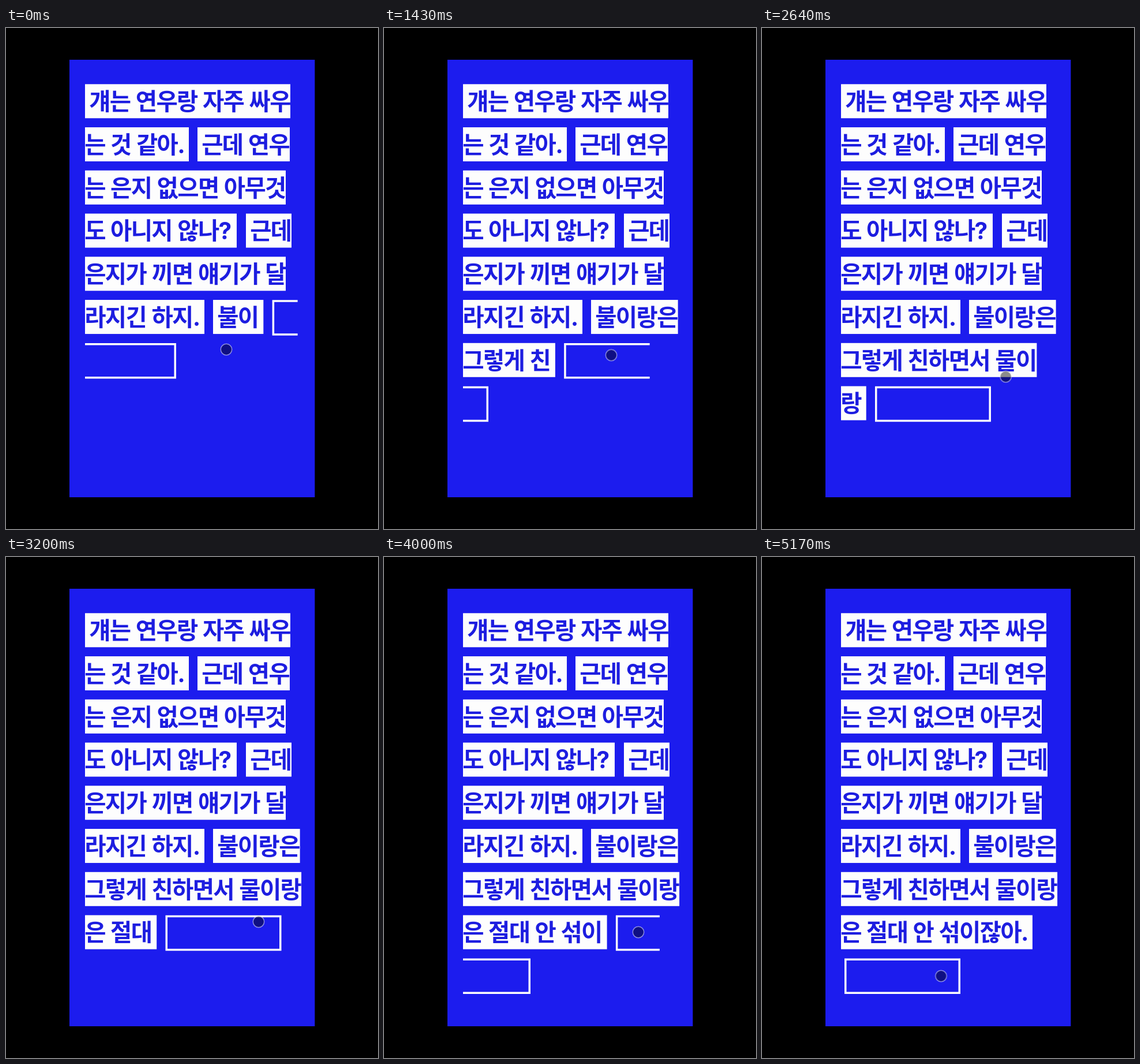
These frames come from a looping animation (645x868 px, 5200 ms). An HTML page:

```html
<!DOCTYPE html>
<html lang="ko">
<head>
<meta charset="utf-8">
<title>대화</title>
<style>
html, body { margin: 0; width: 100%; height: 100%; overflow: hidden; background: #000; }
svg { display: block; width: 645px; height: 868px; }
text {
  font: 700 40.6px "Noto Sans CJK KR", "Noto Sans CJK", sans-serif;
  letter-spacing: -1.68px;
  fill: #1d1de0;
}
.mark { font-family: Inter, sans-serif; }
.box { fill: #fdfdfd; }
.slot { fill: none; stroke: #fdfdfd; stroke-width: 3.5; }
#dot {
  fill: rgba(0, 0, 0, .45);
  stroke: rgba(255, 255, 255, .5);
  stroke-width: 1.5;
  animation: roam 5200ms infinite ease-in-out;
}
@keyframes roam {
  0%, 19% { transform: translate(382px, 557px); }
  37%, 43% { transform: translate(408.5px, 578.5px); }
  59%, 63% { transform: translate(438px, 632px); }
  75.7% { transform: translate(440px, 649px); }
  77%, 86% { transform: translate(441px, 650px); }
  95%, 100% { transform: translate(310.5px, 726px); }
}
</style>
</head>
<body>
<svg viewBox="0 0 645 868">
  <rect x="110" y="55" width="425.4" height="758" fill="#1c1cee"/>
  <g id="fixed"></g>
  <g id="typed"></g>
  <circle id="dot" r="9.7"/>
</svg>
<script>
const LOOP = 5200, LEFT = 137, LIMIT = 512.5, PAD = 8, GAP = 15.3;
const $ = id => document.getElementById(id);
const rowTop = row => 97.3 + 74.75 * row;
const advance = ch => ch === ' ' ? 9.2 : ch === '.' ? 11 : 35.67;
const measure = text => [...text].reduce((sum, ch) => sum + advance(ch), 0);

function box(row, x, right, textX, text) {
  const y = rowTop(row);
  let out = `<rect class="box" x="${x}" y="${y}" width="${right - x}" height="59"/>`;
  for (const word of text.split(' ')) {
    const body = word.replace(/[.?]/g, '<tspan class="mark">$&</tspan>');
    out += `<text x="${textX - 0.8}" y="${y + 44.7}">${body}</text>`;
    textX += measure(word + ' ');
  }
  return out;
}

// Empty answer slot; a side that continues on another row stays open.
function slot(row, x, width, openLeft, openRight) {
  const top = rowTop(row) + 1.9, bottom = top + 58;
  const l = openLeft ? x : x + 1.75;
  const r = openRight ? x + width : x + width - 1.75;
  const d = openRight ? `M${r} ${top}H${l}V${bottom}H${r}`
    : `M${l} ${top}H${r}V${bottom}H${l}${openLeft ? '' : 'Z'}`;
  return `<path class="slot" d="${d}"/>`;
}

$('fixed').innerHTML = [
  [0, 137, 493, 145, '걔는 연우랑 자주 싸우'],
  [1, 137, 317, 137, '는 것 같아.'],
  [1, 332, 492, 340, '근데 연우'],
  [2, 137, 485, 137, '는 은지 없으면 아무것'],
  [3, 137, 400, 137, '도 아니지 않나?'],
  [3, 416, 495, 424, '근데'],
  [4, 137, 485, 137, '은지가 끼면 얘기가 달'],
  [5, 137, 344, 137, '라지긴 하지.']
].map(b => box(...b)).join('');

const LINE = '불이랑은 그렇게 친하면서 물이랑은 절대 안 섞이잖아.';
const TIMES = [270, 610, 900, 1060, 1220, 1400, 1560, 1720, 1880, 2090, 2280,
  2440, 2620, 2850, 3030, 3360, 3580, 3800, 4180, 4380, 4580];
// Slot widths before and after each place where it may wrap.
const SPLITS = [[201, 0], [148.5, 44], [116.5, 84.5], [76, 117], [44, 158]];

// Prefix of LINE holding the given number of non-space characters.
function prefix(count) {
  let end = 0;
  while (count > 0) if (LINE[end++] !== ' ') count--;
  return LINE.slice(0, end);
}

function layout(text) {
  let row = 5, start = 359, textX = start + PAD, part = '', out = '';
  [...text].forEach((ch, i) => {
    const tail = i === text.length - 1 ? PAD : 0;
    if (ch !== ' ' && textX + measure(part + ch) + tail > LIMIT) {
      const full = part.trimEnd();
      out += box(row++, start, textX + measure(full), textX, full);
      start = textX = LEFT;
      part = '';
    }
    part += ch;
  });
  const right = textX + measure(part) + PAD;
  out += box(row, start, right, textX, part);

  const from = right + GAP;
  const split = SPLITS.find(([w]) => from + w <= LIMIT);
  if (!split) return out + slot(row + 1, LEFT + 6, 201);
  const [head, rest] = split;
  out += slot(row, from, head, false, rest > 0);
  if (rest) out += slot(row + 1, LEFT, rest, true, false);
  return out;
}

const clock = $('dot').getAnimations()[0];
let shown = -1;
function frame() {
  const t = (clock.currentTime || 0) % LOOP;
  const count = 2 + TIMES.filter(at => at <= t).length;
  if (count !== shown) {
    shown = count;
    $('typed').innerHTML = layout(prefix(count));
  }
  requestAnimationFrame(frame);
}
frame();
</script>
</body>
</html>
```
